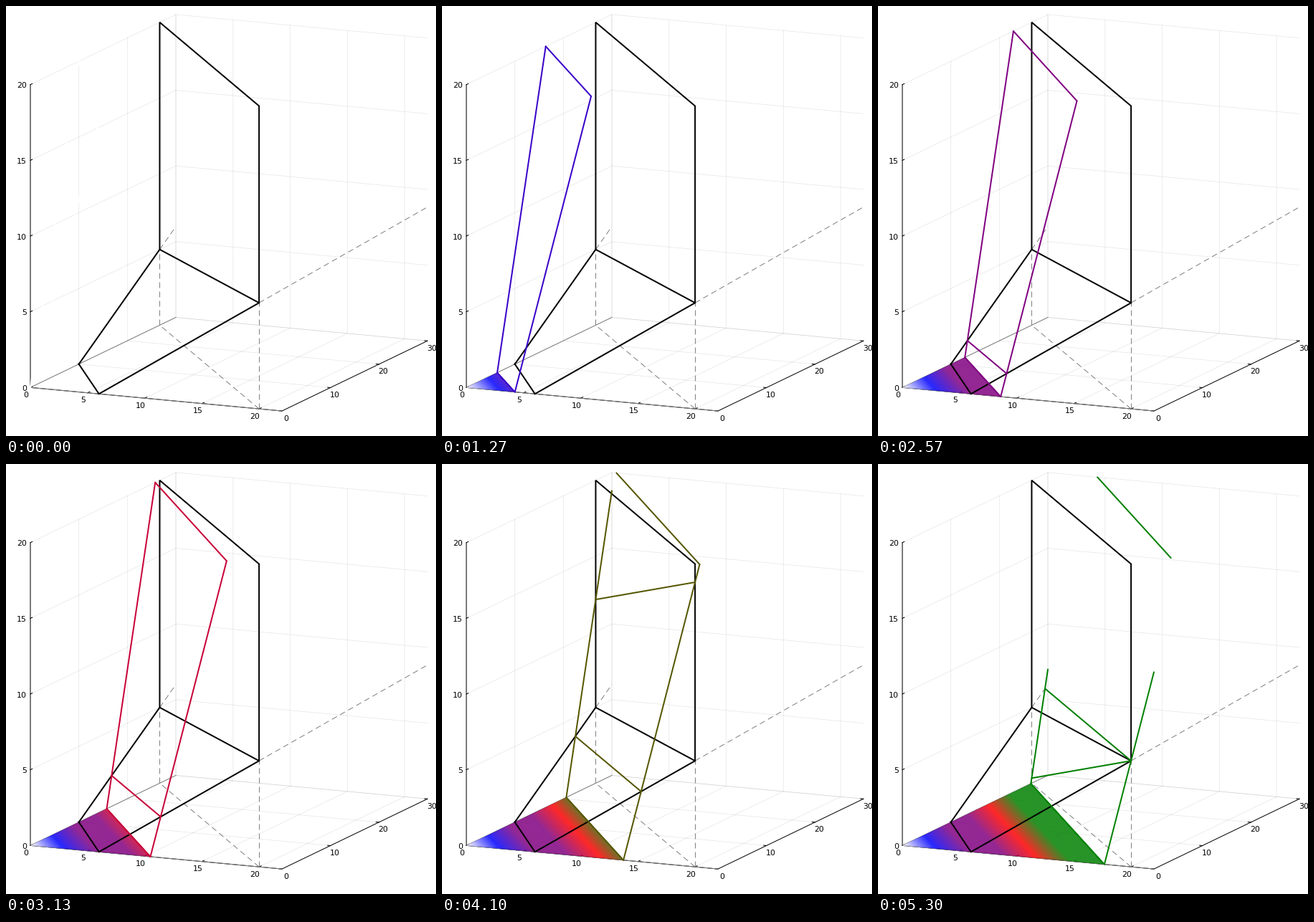
These frames come from a looping animation (600 px wide and 600 px high, 8.01 s). A matplotlib script:

```python
import matplotlib.pyplot as plt
import numpy as np
from matplotlib.animation import FuncAnimation
from matplotlib.collections import LineCollection
from matplotlib.colors import LinearSegmentedColormap

SIZE, DPI = 600, 100
PX = 72 / DPI
INTERVAL, FRAMES = 30, 267
STEP, BEST, LAST = 0.335, 53, 159
BOX = np.array([22, 30, 20])
ORIGIN = np.array([34, 532.3])
AXES = np.array([[15.955, 1.49], [6.767, -3.26], [0, -21.13]])
RAMP = LinearSegmentedColormap.from_list(
    "level", ["white", "blue", "purple", "purple", "red", "green", "green"], N=1024)

plt.rcParams["font.family"] = "DejaVu Sans"
fig = plt.figure(figsize=(SIZE / DPI, SIZE / DPI), dpi=DPI, facecolor="white")
ax = fig.add_axes([0, 0, 1, 1])
ax.set_xlim(0, SIZE)
ax.set_ylim(SIZE, 0)
ax.axis("off")


def project(points):
    return ORIGIN + np.asarray(points, float) @ AXES


def draw(points, color, width=1.0, **style):
    x, y = project(points).T
    return ax.plot(x, y, color=color, lw=width * PX, **style)[0]


def label(text, x, y, ha="center"):
    ax.text(x, y, text, fontsize=11 * PX, ha=ha, va="center_baseline")


def clip(start, end):
    """Part of a 3D segment inside the axis box, or None."""
    start, end = np.array(start, float), np.array(end, float)
    delta = end - start
    low, high = 0.0, 1.0
    for s, d, size in zip(start, delta, BOX):
        if abs(d) < 1e-9:
            if s < -1e-9 or s > size + 1e-9:
                return None
            continue
        near, far = sorted((-s / d, (size - s) / d))
        low, high = max(low, near), min(high, far)
    if low > high:
        return None
    return project([start + low * delta, start + high * delta])


def draw_grid():
    style = dict(color="black", width=0.8, alpha=0.09, zorder=1)
    for x in range(0, 21, 5):
        draw([(x, 0, 0), (x, 30, 0), (x, 30, 20)], **style)
    for y in range(0, 31, 10):
        draw([(22, y, 0), (0, y, 0), (0, y, 20)], **style)
    for z in range(0, 21, 5):
        draw([(0, 0, z), (0, 30, z), (22, 30, z)], **style)


def draw_axes():
    draw([(0, 0, 20), (0, 0, 0), (22, 0, 0), (22, 30, 0)], "black", zorder=2)
    for x in range(0, 21, 5):
        draw([(x, 0, 0), (x, 0.45, 0)], "black", zorder=2)
        px, py = project((x, 0, 0))
        label(str(x), px - 6, py + 9.5)
    for y in range(0, 31, 10):
        draw([(22, y, 0), (21.75, y, 0)], "black", zorder=2)
        px, py = project((22, y, 0))
        label(str(y), px + 5.8, py + 9.5)
    for z in range(0, 21, 5):
        draw([(0, 0, z), (0, 0.4, z)], "black", zorder=2)
        px, py = project((0, 0, z))
        label(str(z), px - 5, py + 0.5, ha="right")


def draw_region():
    right, left = (20, 0, 7), (0, 80 / 3, 5)
    foot_right, foot_left = (20, 0, 0), (0, 80 / 3, 0)
    draw([(0, 30, 0), (0, 0, 0), (22, 0, 0)], "gray", zorder=3)
    end = (588 - ORIGIN[0]) / AXES[0, 0]
    for path in ([right, (end, 0, (end - 6) / 2)], [left, (0, 30, 6)],
                 [foot_right, right], [foot_left, left], [foot_right, foot_left]):
        draw(path, "gray", dashes=(8, 5), dash_capstyle="butt", zorder=3)
    ax.lines[-1].set_zorder(3)
    for path in ([(0, 10, 0), (6, 0, 0), right, left, (0, 10, 0)],
                 [right, (20, 0, 20), (0, 80 / 3, 20), left]):
        draw(path, "black", 2, solid_joinstyle="miter", zorder=5)


def level_at(step):
    return min(STEP * step, BEST)


def trace(c):
    """Floor segment of the plane 3x + 2y - z = c."""
    return project([(c / 3, 0, 0), (0, c / 2, 0)])


def plane_segments(c):
    top = c + 20
    slope_x, slope_y = (c - 3) / 2.5, (c - 3) / 1.7
    edges = [
        ((c / 3, 0, 0), (0, c / 2, 0)),
        ((0, c / 2, 0), (0, top / 2, 20)),
        ((0, top / 2, 20), (top / 3, 0, 20)),
        ((top / 3, 0, 20), (c / 3, 0, 0)),
        # crossings with the ramp and with the upright wall
        ((slope_x, 0, (slope_x - 6) / 2), (0, slope_y, 0.3 * (slope_y - 10))),
        ((20, 0, 60 - c), (0, 80 / 3, 160 / 3 - c)),
    ]
    return [s for s in (clip(a, b) for a, b in edges) if s is not None]


draw_grid()
draw_axes()
draw_region()

levels = [level_at(i) for i in range(LAST + 1)]
traces = [trace(c) for c in levels]
colors = [RAMP(c / BEST) for c in levels]
swept = LineCollection([], linewidths=1.15 * PX, zorder=4)
plane = LineCollection([], linewidths=2 * PX, capstyle="round", zorder=6)
ax.add_collection(swept, autolim=False)
ax.add_collection(plane, autolim=False)


def update(frame):
    step = min(LAST, int((frame * INTERVAL + 20) * 0.03 + 1e-6))
    swept.set_segments(traces[:step + 1])
    swept.set_color(colors[:step + 1])
    plane.set_segments(plane_segments(levels[step]))
    plane.set_color(colors[step])
    return swept, plane


anim = FuncAnimation(fig, update, frames=FRAMES, interval=INTERVAL,
                     repeat=True, repeat_delay=0, blit=False)
plt.show()
```
